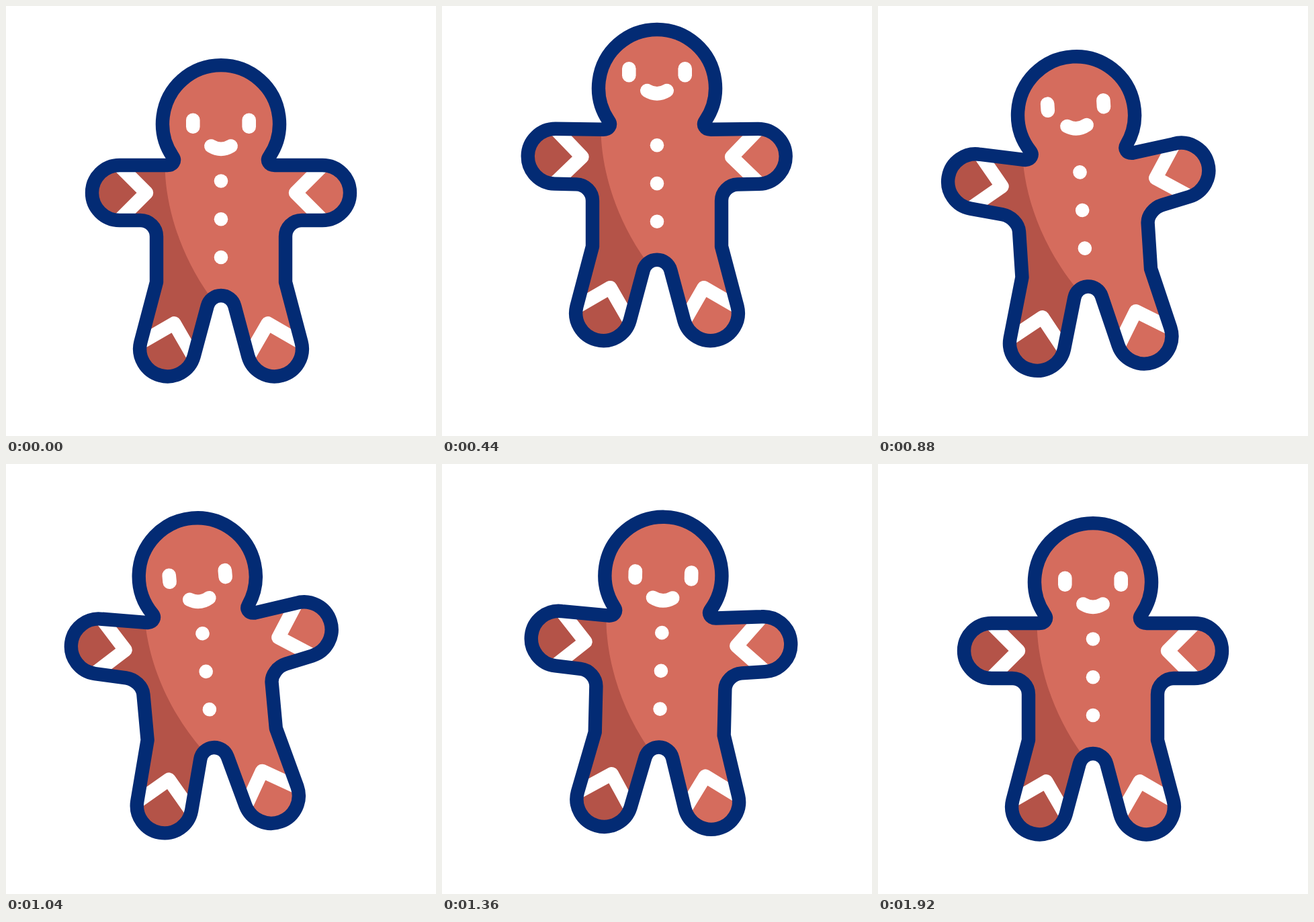
These frames come from a looping animation (640x640 px, 2.08 s). An HTML page:

```html
<!DOCTYPE html>
<html lang="en">
<head>
<meta charset="utf-8">
<title>Gingerbread hop</title>
<style>
  html, body { margin: 0; width: 100%; height: 100%; overflow: hidden; background: #fff; }
  svg { display: block; width: 100%; height: 100%; }
  .icing { fill: none; stroke: #fff; stroke-width: 20.5; stroke-linejoin: round; }
</style>
</head>
<body>
<svg viewBox="0 0 640 640">
  <defs>
    <clipPath id="inside"><path class="shape"/></clipPath>
    <path id="chevron" d="M-3 -43 L40 0 L-3 43"/>
  </defs>
  <g id="figure">
    <path class="shape" fill="#d56c5d"/>
    <g clip-path="url(#inside)">
      <path fill="#b45348" d="M236.5 237 C237 293 256 366 304 433 V600 H60 V150 H100Z"/>
      <g class="icing">
        <g id="leftArm"><use href="#chevron" transform="translate(169 278)"/></g>
        <g id="rightArm"><use href="#chevron" transform="translate(471 278) scale(-1 1)"/></g>
        <use href="#chevron" transform="translate(240 511) rotate(-75)"/>
        <use href="#chevron" transform="translate(400 511) rotate(-105)"/>
      </g>
    </g>
    <path class="shape" fill="none" stroke="#032b74" stroke-width="20.4" stroke-linejoin="round"/>
    <g fill="#fff">
      <circle cx="320" cy="260.5" r="10.3"/>
      <circle cx="320" cy="317.3" r="10.3"/>
      <circle cx="320" cy="374" r="10.3"/>
      <g id="eyes">
        <rect x="268" y="159.5" width="20.6" height="30.6" rx="10.3"/>
        <rect x="351.4" y="159.5" width="20.6" height="30.6" rx="10.3"/>
      </g>
    </g>
    <path id="mouth" class="icing" stroke-linecap="round" d="M305.3 208.5 Q320 217.2 334.7 208.5"/>
  </g>
</svg>
<script>
const LOOP = 2080, STEP = 40;
const byId = id => document.getElementById(id);
const shapes = document.querySelectorAll('.shape');

// Shoulders: side is -1 for left, 1 for right
const LEFT = { side: -1, pivot: [222, 251] };
const RIGHT = { side: 1, pivot: [425, 273] };

// [time, degrees] and [peak time, half duration, height]
const LEAN = [[770, 0], [960, -6], [1005, -6], [1232, 6], [1484, -3], [1672, 3], [1920, 0]];
const HOPS = [[530, 403, 56], [1200, 226, 19], [1660, 190, 7]];

function ease(t, from, to) {
  const u = Math.min(1, Math.max(0, (t - from) / (to - from)));
  return u * u * (3 - 2 * u);
}

const pulse = (t, a, b, c, d) => ease(t, a, b) - ease(t, c, d);

const lean = t => LEAN.slice(1).reduce((sum, [end, value], i) =>
  sum + (value - LEAN[i][1]) * ease(t, LEAN[i][0], end), 0);

const lift = t => HOPS.reduce((sum, [peak, half, height]) =>
  sum + height * Math.max(0, 1 - ((t - peak) / half) ** 2), 0);

function turn([x, y], [px, py], degrees) {
  const a = degrees * Math.PI / 180, c = Math.cos(a), s = Math.sin(a);
  return [px + (x - px) * c - (y - py) * s, py + (x - px) * s + (y - py) * c];
}

const mix = (p, q, k) => p.map((v, i) => v + (q[i] - v) * k);
const pt = p => p.map(v => v.toFixed(2)).join(' ');

// Outline points of an arm and the rounded armpit below it
function armPoints({ side, pivot }, angle) {
  const x = 320 + side * 151, wall = 320 + side * 96;
  const top = turn([x, 237], pivot, angle);
  const bottom = turn([x, 319], pivot, angle);
  const slope = Math.tan(angle * Math.PI / 180);
  const corner = [wall, bottom[1] + (wall - bottom[0]) * slope];
  const before = mix(corner, bottom, 24 / Math.hypot(bottom[0] - corner[0], bottom[1] - corner[1]));
  const after = [wall, 343];
  return { top, bottom, before, after, c1: mix(before, corner, .55), c2: mix(after, corner, .55) };
}

function outline(leftAngle, rightAngle) {
  const l = armPoints(LEFT, leftAngle), r = armPoints(RIGHT, rightAngle);
  return `M240 237 C248.5 237 252.5 230.5 248 224
    A87 87 0 1 1 392 224 C387.5 230.5 391.5 237 400 237
    L${pt(r.top)} A41 41 0 0 1 ${pt(r.bottom)}
    L${pt(r.before)} C${pt(r.c1)} ${pt(r.c2)} ${pt(r.after)}
    L416 411 L439.6 500.4 A41 41 0 0 1 360.4 521.6
    L340.3 446.6 A21 21 0 0 0 299.7 446.6
    L279.6 521.6 A41 41 0 0 1 200.4 500.4 L224 411
    L${pt(l.after)} C${pt(l.c2)} ${pt(l.c1)} ${pt(l.before)}
    L${pt(l.bottom)} A41 41 0 0 1 ${pt(l.top)} Z`;
}

function draw(t) {
  const raise = 14 * pulse(t, 353, 838, 907, 1694);
  const leftAngle = raise, rightAngle = -.93 * raise;
  const d = outline(leftAngle, rightAngle);
  shapes.forEach(s => s.setAttribute('d', d));
  byId('leftArm').setAttribute('transform', `rotate(${leftAngle} ${LEFT.pivot})`);
  byId('rightArm').setAttribute('transform', `rotate(${rightAngle} ${RIGHT.pivot})`);

  const look = pulse(t, 120, 400, 780, 1010);
  byId('eyes').setAttribute('transform', `translate(0 ${-23.3 * look})`);
  byId('mouth').setAttribute('transform', `translate(0 ${-29.3 * look})`);
  byId('figure').setAttribute('transform', `translate(0 ${-lift(t)}) rotate(${lean(t)} 320 562)`);
}

const start = performance.now();
function tick() {
  const t = (performance.now() - start) % LOOP;
  draw(Math.floor(t / STEP) * STEP);
  requestAnimationFrame(tick);
}
tick();
</script>
</body>
</html>
```
